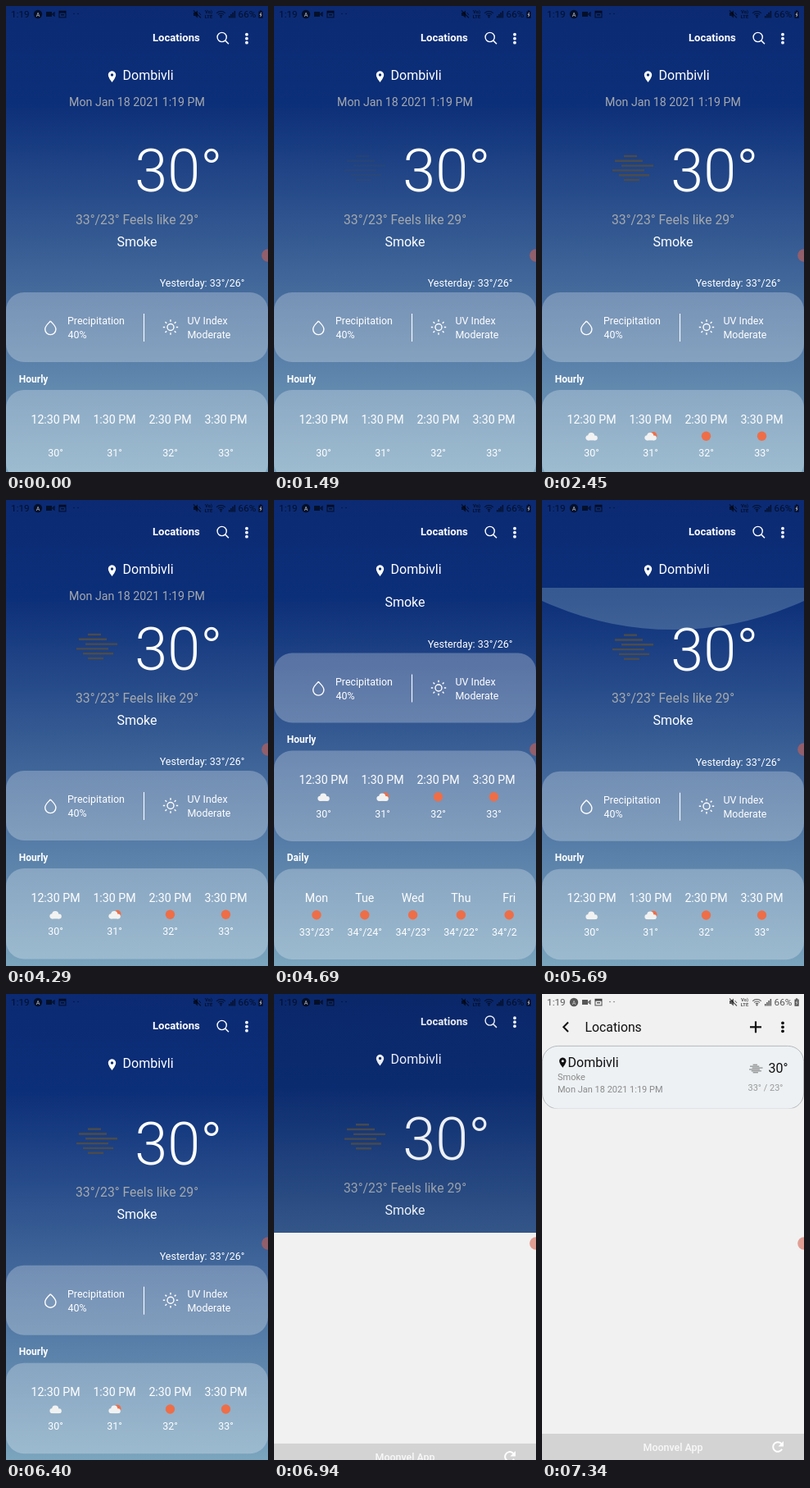
An HTML page with a canvas that plays this animation: 320x568 px, repeating every 7840 ms.

```html
<!DOCTYPE html>
<html lang="en">
<head>
<meta charset="utf-8">
<title>Weather</title>
<style>
  html, body { margin: 0; width: 100%; height: 100%; overflow: hidden; background: #0b2c75; }
  canvas { display: block; width: 320px; height: 568px; }
</style>
</head>
<body>
<canvas id="stage"></canvas>
<script>
const W = 320, H = 568, LOOP = 7840;
const ORANGE = '#ee6e48', WHITE = '#fff', GRAY = '#a5a9ac', INK = '#111';
const canvas = document.getElementById('stage');
const ctx = canvas.getContext('2d');
const dpr = window.devicePixelRatio || 1;
canvas.width = W * dpr;
canvas.height = H * dpr;

// Spans in which the picture advances, with a step every 100 ms
const SPANS = [[1490, 1890], [2050, 2450], [4290, 4990], [5090, 5790], [5900, 6000], [6200, 6400], [6940, 7340]];

const clamp = v => Math.min(1, Math.max(0, v));

function stepTime(t) {
  let last = 0;
  for (const [from, to] of SPANS) {
    if (t >= from) last = Math.min(to, from + Math.floor((t - from) / 100) * 100);
  }
  return last;
}

function text(str, x, y, size, color = WHITE, align = 'left', weight = 400) {
  ctx.font = `${weight} ${size}px Roboto, sans-serif`;
  ctx.fillStyle = color;
  ctx.textAlign = align;
  ctx.fillText(str, x, y);
}

function dot(x, y, r, color) {
  ctx.fillStyle = color;
  ctx.beginPath();
  ctx.arc(x, y, r, 0, 7);
  ctx.fill();
}

function line(points, color, width) {
  ctx.strokeStyle = color;
  ctx.lineWidth = width;
  ctx.beginPath();
  points.forEach(([x, y]) => ctx.lineTo(x, y));
  ctx.stroke();
}

function ring(x, y, r, color, width, from = 0, to = 2 * Math.PI) {
  ctx.strokeStyle = color;
  ctx.lineWidth = width;
  ctx.beginPath();
  ctx.arc(x, y, r, from, to);
  ctx.stroke();
}

function roundRect(x, y, w, h, r) {
  ctx.beginPath();
  ctx.moveTo(x + r, y);
  ctx.arcTo(x + w, y, x + w, y + h, r);
  ctx.arcTo(x + w, y + h, x, y + h, r);
  ctx.arcTo(x, y + h, x, y, r);
  ctx.arcTo(x, y, x + w, y, r);
  ctx.closePath();
}

function card(y, h) {
  ctx.fillStyle = 'rgba(255,255,255,.26)';
  roundRect(0, y, W, h, 22);
  ctx.fill();
}

function clipped(x, y, w, h, draw) {
  ctx.save();
  ctx.beginPath();
  ctx.rect(x, y, w, h);
  ctx.clip();
  draw();
  ctx.restore();
}

function faded(alpha, draw) {
  if (alpha <= 0) return;
  ctx.save();
  ctx.globalAlpha *= alpha;
  draw();
  ctx.restore();
}

function pin(x, y, color, s = 1) {
  ctx.save();
  ctx.translate(x, y);
  ctx.scale(s, s);
  ctx.fillStyle = color;
  ctx.beginPath();
  ctx.arc(0, -2, 4.7, Math.PI * 0.9, Math.PI * 2.1);
  ctx.quadraticCurveTo(3.6, 2.6, 0, 7);
  ctx.quadraticCurveTo(-3.6, 2.6, -4.5, -0.6);
  ctx.arc(0, -2, 1.7, 0, 7);
  ctx.fill('evenodd');
  ctx.restore();
}

function menuDots(x, y, color) {
  for (const d of [-5, 0, 5]) dot(x, y + d, 1.9, color);
}

function smoke(x, y, s, color) {
  const bars = [[-11, 5], [-22, 12], [-14, 25], [-25, 14], [-17, 20], [-11, 8]];
  bars.forEach(([a, b], i) => {
    const by = y + (i - 2.5) * 5.8 * s;
    line([[x + a * s, by], [x + b * s, by]], color, 2.4 * s);
  });
}

function cloud(x, y) {
  const color = '#f2f2f2';
  dot(x - 4, y + 1.6, 3.1, color);
  dot(x - 0.3, y - 0.8, 4, color);
  dot(x + 4.4, y + 1.8, 2.9, color);
  ctx.fillRect(x - 4, y + 1, 8.5, 3.7);
}

function skyIcon(kind, x, y) {
  if (kind === 'sun') dot(x, y, 5.7, ORANGE);
  if (kind === 'part') dot(x + 3.6, y - 0.8, 4.4, ORANGE);
  if (kind !== 'sun') cloud(x, y + 0.4);
}

function forecast(top, items, iconAlpha) {
  for (const [x, label, kind, temp] of items) {
    text(label, x, top + 40.5, 14.2, WHITE, 'center');
    faded(iconAlpha, () => skyIcon(kind, x, top + 56.3));
    text(temp, x, top + 81.3, 12.44, WHITE, 'center');
  }
}

const HOURS = [
  [60.5, '12:30 PM', 'cloud', '30°'],
  [132.5, '1:30 PM', 'part', '31°'],
  [200.5, '2:30 PM', 'sun', '32°'],
  [268.5, '3:30 PM', 'sun', '33°']
];
const DAYS = [
  ['Mon', '33°/23°'], ['Tue', '34°/24°'], ['Wed', '34°/23°'], ['Thu', '34°/22°'], ['Fri', '34°/22°']
].map(([day, temp], i) => [52 + i * 58.8, day, 'sun', temp]);

function drop(x, y) {
  ctx.strokeStyle = WHITE;
  ctx.lineWidth = 1.4;
  ctx.beginPath();
  ctx.moveTo(x, y - 8);
  ctx.bezierCurveTo(x + 3, y - 4.6, x + 6.6, y - 2, x + 6.6, y + 2);
  ctx.arc(x, y + 2, 6.6, 0, Math.PI);
  ctx.bezierCurveTo(x - 6.6, y - 2, x - 3, y - 4.6, x, y - 8);
  ctx.stroke();
}

function uvSun(x, y) {
  ring(x, y, 4, WHITE, 1.4);
  for (let i = 0; i < 8; i++) {
    const c = Math.cos(i * Math.PI / 4), s = Math.sin(i * Math.PI / 4);
    line([[x + c * 6.8, y + s * 6.8], [x + c * 9.2, y + s * 9.2]], WHITE, 1.5);
  }
}

function background() {
  const g = ctx.createLinearGradient(0, 0, 0, H);
  g.addColorStop(0, '#0b2a73');
  g.addColorStop(0.21, '#0c2f79');
  g.addColorStop(1, '#7ba4be');
  ctx.fillStyle = g;
  ctx.fillRect(0, 0, W, H + 12);
}

function list(shift, smokeAlpha, iconAlpha) {
  ctx.save();
  ctx.translate(0, -shift);
  faded(smokeAlpha, () => smoke(111, 197.5, 1, '#4c4b4a'));
  text('30°', 157.3, 226.2, 72, WHITE, 'left', 300);
  text('33°/23° Feels like 29°', 160, 265.5, 15.75, GRAY, 'center');
  text('Smoke', 160, 292.5, 16, WHITE, 'center');
  text('Yesterday: 33°/26°', 291.5, 342, 12.55, WHITE, 'right');

  card(349, 85);
  drop(54.3, 392);
  text('Precipitation', 75, 388.3, 12.44);
  text('40%', 75.5, 405.3, 12.44);
  line([[168.5, 375], [168.5, 409]], WHITE, 1.1);
  uvSun(201, 391.5);
  text('UV Index', 221.5, 388.3, 12.44);
  text('Moderate', 221.5, 405.3, 12.44);

  text('Hourly', 15.8, 458.5, 12, WHITE, 'left', 700);
  card(468, 110.5);
  forecast(468, HOURS, iconAlpha);

  text('Daily', 15.8, 602.5, 12, WHITE, 'left', 700);
  card(612, 110.5);
  clipped(24, 612, 273, 111, () => forecast(612, DAYS, 1));
  ctx.restore();
}

function edgeGlow(top, k) {
  if (k <= 0) return;
  const r = 383;
  clipped(0, top, W, 60, () => {
    ctx.translate(0, top);
    ctx.scale(1, k);
    dot(W / 2, 51 - r, r, `rgba(190,225,225,${0.24 * k})`);
  });
}

// Values spaced 100 ms apart
const UP = [19, 58, 101, 138, 162.5];
const DOWN = [150, 118, 84, 52, 30, 18.3];
const pick = (track, t) => track[Math.min(track.length - 1, Math.floor(t / 100))];

function shiftAt(t) {
  if (t < 4290) return 0;
  return t < 5090 ? pick(UP, t - 4290) : pick(DOWN, t - 5090);
}

function glowAt(t) {
  if (t < 5590) return 0;
  if (t < 5690) return 0.5;
  return (1 - clamp((t - 5750) / 600)) ** 2;
}

function home(t) {
  const collapsed = t >= 4390;
  const top = collapsed ? 107 : 126;
  background();
  text('Locations', 179, 43.3, 13.1, WHITE, 'left', 700);
  ring(263.7, 38, 5.6, WHITE, 1.4);
  line([[267.8, 42.1], [272, 46.3]], WHITE, 1.5);
  menuDots(294, 39.7, WHITE);
  pin(129.5, 86, WHITE);
  text('Dombivli', 142.5, 90, 16);
  if (!collapsed) text('Mon Jan 18 2021 1:19 PM', 160, 122, 14.2, GRAY, 'center');
  clipped(0, top, W, H - top, () => {
    list(shiftAt(t), clamp((t - 1390) / 500), clamp((t - 1950) / 500));
  });
  edgeGlow(top, glowAt(t));
}

function locations() {
  ctx.fillStyle = '#f1f1f1';
  ctx.fillRect(0, 0, W, H);
  line([[32, 34.5], [26.3, 40.3], [32, 46]], INK, 2);
  text('Locations', 52.5, 46, 15.8, INK);
  line([[254, 40.3], [268, 40.3]], INK, 2.2);
  line([[261, 33.3], [261, 47.3]], INK, 2.2);
  menuDots(294, 40.3, INK);

  roundRect(0.4, 63.4, W - 0.8, 76.6, 19);
  ctx.fillStyle = '#edf1f4';
  ctx.fill();
  clipped(0, 60, W, 79.4, () => {
    roundRect(0.4, 63.4, W - 0.8, 76.6, 19);
    ctx.strokeStyle = '#a6abaf';
    ctx.lineWidth = 0.8;
    ctx.stroke();
  });
  pin(25.3, 83.5, INK, 0.9);
  text('Dombivli', 31.5, 89, 16, INK);
  text('Smoke', 19, 105.3, 11, '#8a8a8a');
  text('Mon Jan 18 2021 1:19 PM', 19, 120, 11, '#8a8a8a');
  smoke(261.3, 91, 0.33, '#555');
  text('30°', 276.5, 96.3, 16, INK);
  text('33° / 23°', 251.5, 117.5, 11, '#999');

  ctx.fillStyle = '#d3d3d3';
  ctx.fillRect(0, 536, W, 32);
  text('Moonvel App', 160, 557, 12.44, '#f8f8f8', 'center', 500);
  ring(288, 552, 5.8, WHITE, 2, 0.5, 5.6);
  ctx.fillStyle = WHITE;
  ctx.beginPath();
  ctx.moveTo(295, 545);
  ctx.lineTo(295, 551.5);
  ctx.lineTo(288.5, 551.5);
  ctx.fill();
}

function statusBar() {
  const c = '#000';
  faded(0.64, () => {
    text('1:19', 6, 14.3, 11.8, c);
    dot(39, 10, 5.2, c);
    text('A', 39, 12.6, 7, '#ddd', 'center', 700);
    ctx.fillStyle = c;
    ctx.fillRect(49, 7, 7, 6);
    line([[56.5, 10], [59, 8], [59, 12], [56.5, 10]], c, 1.2);
    ctx.strokeStyle = c;
    ctx.lineWidth = 1.1;
    ctx.strokeRect(65, 6.3, 8, 7.6);
    ctx.fillRect(65, 6.3, 8, 2.4);
    ctx.fillRect(67, 10, 4, 1.5);
    dot(83, 9.5, 0.7, c);
    dot(88, 9.5, 0.7, c);

    ctx.fillStyle = c;
    ctx.beginPath();
    ctx.moveTo(229, 8); ctx.lineTo(231, 8); ctx.lineTo(234, 5.5);
    ctx.lineTo(234, 14.5); ctx.lineTo(231, 12); ctx.lineTo(229, 12);
    ctx.fill();
    line([[229, 5.5], [238, 14.5]], c, 1.1);
    line([[235.5, 8], [238, 11]], c, 1);
    text('Vo)', 247.5, 9.4, 5.8, c, 'center', 700);
    text('LTE', 247.5, 14.8, 5.8, c, 'center', 700);
    for (const r of [2.5, 5, 7.5]) ring(262.5, 14, r, c, 1.1, -2.35, -0.8);
    dot(262.5, 13.4, 1, c);
    for (let i = 0; i < 4; i++) {
      ctx.fillRect(272 + i * 2.2, 12 - i * 2, 1.5, 2.5 + i * 2);
    }
    text('66%', 283.5, 14.3, 11.8, c);
    ctx.fillRect(308.5, 6.5, 5.2, 8.3);
    ctx.fillRect(310, 5.3, 2.2, 1.3);
  });
  line([[311.8, 8], [310.2, 10.6], [312, 10.6], [310.6, 13.2]], '#ddd', 0.8);
}

// Decelerating tail of the page-opening curve
function openCurve(u) {
  if (u >= 1) return 1;
  const bez = (a, b, c, d, s) => {
    const q = 1 - s;
    return a * q * q * q + 3 * b * s * q * q + 3 * c * s * s * q + d * s * s * s;
  };
  let lo = 0, hi = 1;
  for (let i = 0; i < 30; i++) {
    const mid = (lo + hi) / 2;
    if (bez(0.16667, 0.20833, 0.25, 1, mid) < u) lo = mid; else hi = mid;
  }
  return bez(0.4, 0.82, 1, 1, lo);
}

function render(time) {
  const t = stepTime(time);
  ctx.setTransform(dpr, 0, 0, dpr, 0, 0);
  ctx.fillStyle = '#000';
  ctx.fillRect(0, 0, W, H);
  if (t < 6940) {
    home(t);
  } else {
    const p = openCurve((t - 6865.2) / 425);
    const rise = 0.041 * H * (1 - p);
    const edge = 0.959 * H * (1 - p) + rise;
    ctx.save();
    ctx.translate(0, -0.0196 * H * p);
    faded(0.92, () => home(t));
    ctx.restore();
    clipped(0, edge, W, H - edge, () => {
      ctx.translate(0, rise);
      locations();
    });
  }
  statusBar();
  dot(320, 304, 7.8, 'rgba(212,95,75,.57)');
}

const start = performance.now();
function tick() {
  render((performance.now() - start) % LOOP);
  requestAnimationFrame(tick);
}
tick();
</script>
</body>
</html>
```
